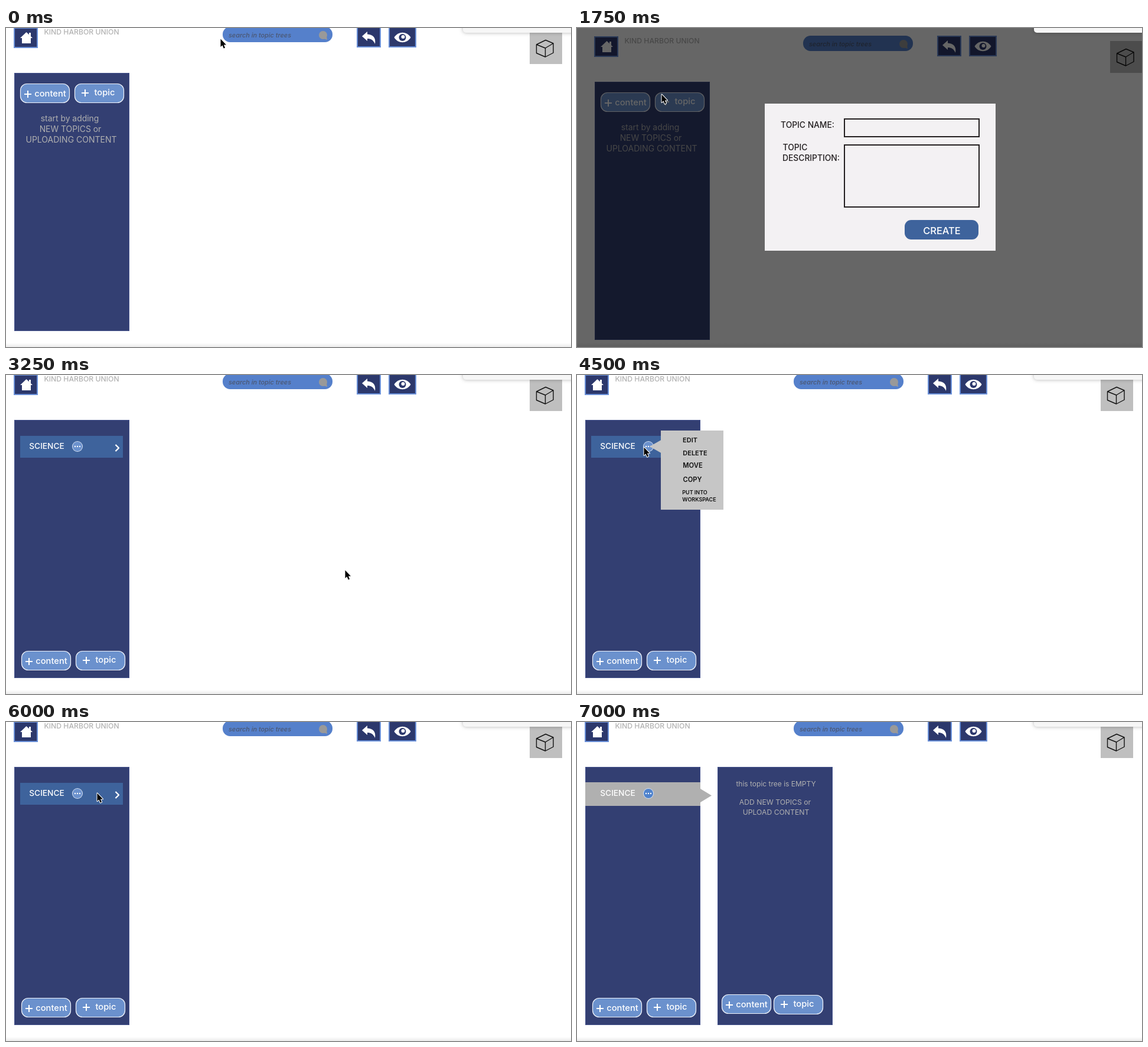
Recreate the animation shown at these times as an HTML page with a canvas. Size 957x540 px, loop 7.25 s.

```html
<!DOCTYPE html>
<html lang="en">
<head>
<meta charset="utf-8">
<title>Topic tree</title>
<style>
html, body { margin: 0; width: 100%; height: 100%; overflow: hidden; background: #fff; }
canvas { display: block; }
</style>
</head>
<body>
<canvas id="stage" width="957" height="540"></canvas>
<script>
const W = 957, H = 540, LOOP = 7250;
const ctx = document.getElementById('stage').getContext('2d');
const NAVY = '#333f72', BLUE = '#6b91cd', STEEL = '#3e639c', GREY = '#b0b0b0', INK = '#231f20';

// Pointer tip: start time, x, y
const POINTER = [
  [0, 363, 18], [250, 365, 13], [500, 223, 121], [750, 165, 110], [1000, 164, 107],
  [1250, 143, 112], [2250, 419, 195], [2500, 562, 311], [2750, 573, 325],
  [3000, 574, 328], [3250, 574, 330], [3500, 289, 222], [3750, 101, 143],
  [4000, 113, 122], [4750, 115, 122], [5500, 118, 122], [5750, 153, 120], [6000, 154, 120]
];
const POINTER_GONE = 6750;

function rect(x, y, w, h, fill) {
  ctx.fillStyle = fill;
  ctx.fillRect(x, y, w, h);
}

function frame(x, y, w, h, color, line) {
  ctx.strokeStyle = color;
  ctx.lineWidth = line;
  ctx.strokeRect(x + line / 2, y + line / 2, w - line, h - line);
}

function pill(x, y, w, h, r, fill) {
  ctx.beginPath();
  ctx.roundRect(x, y, w, h, r);
  ctx.fillStyle = fill;
  ctx.fill();
}

function disc(x, y, r, fill) {
  ctx.beginPath();
  ctx.arc(x, y, r, 0, Math.PI * 2);
  ctx.fillStyle = fill;
  ctx.fill();
}

function trace(points) {
  ctx.beginPath();
  points.forEach(([x, y]) => ctx.lineTo(x, y));
}

function polygon(points, fill) {
  trace(points);
  ctx.closePath();
  ctx.fillStyle = fill;
  ctx.fill();
}

function polyline(points, color, line) {
  trace(points);
  ctx.strokeStyle = color;
  ctx.lineWidth = line;
  ctx.stroke();
}

// Text centred on x, standing on baseline y
function text(str, x, y, size, color, style = '500') {
  ctx.font = `${style} ${size}px Inter, "Open Sans", sans-serif`;
  ctx.textAlign = 'center';
  ctx.fillStyle = color;
  ctx.fillText(str, x, y);
}

function plus(x, y) {
  rect(x - 6, y - 1, 12, 2, '#fff');
  rect(x - 1, y - 6, 2, 12, '#fff');
}

function addButton(label, x, y, plusX, plusY) {
  pill(x + .5, y + .5, 83, 32, 11, BLUE);
  ctx.strokeStyle = '#f0f4fb';
  ctx.lineWidth = 1.2;
  ctx.stroke();
  plus(x + plusX, y + plusY);
  text(label, x + 51, y + plusY + 4, 14.7, '#fff');
}

const contentButton = (x, y) => addButton('content', x, y, 13, 18);
const topicButton = (x, y) => addButton('topic', x, y, 18, 16);

function panel(x) {
  rect(x, 76, 195, 437, NAVY);
  frame(x, 76, 195, 437, '#44528c', 1);
}

function iconBox(x, y, w, h) {
  rect(x, y, w, h, '#2c386c');
  frame(x, y, w, h, '#6a90d8', 2);
}

function homeIcon() {
  iconBox(13, -1, 41, 35);
  polygon([[34.5, 7], [45, 17], [42, 17], [42, 26], [27, 26], [27, 17], [24, 17]], '#fff');
  rect(39, 8, 3, 6, '#fff');
}

function backIcon() {
  iconBox(594, -2, 41, 35);
  ctx.beginPath();
  ctx.moveTo(603, 14);
  ctx.lineTo(612, 6);
  ctx.lineTo(612, 10.5);
  ctx.bezierCurveTo(621, 11, 627, 16, 625, 27);
  ctx.bezierCurveTo(622, 20, 618, 18, 612, 18);
  ctx.lineTo(612, 22);
  ctx.closePath();
  ctx.fillStyle = '#fff';
  ctx.fill();
}

function eyeIcon() {
  iconBox(648, -2, 47, 35);
  ctx.beginPath();
  ctx.moveTo(657.5, 16);
  ctx.bezierCurveTo(664, 5, 679, 5, 685.5, 16);
  ctx.bezierCurveTo(679, 27, 664, 27, 657.5, 16);
  ctx.fillStyle = '#fff';
  ctx.fill();
  disc(671.5, 16, 6, '#2c386c');
  disc(672.5, 15, 3, '#fff');
}

function searchBar() {
  pill(367, -2, 186, 26, 12.5, '#5580cb');
  text('search in topic trees', 430, 15.5, 10.9, '#4b5671', 'italic 500');
  polygon([[538, 18], [543, 14], [544, 20]], '#999');
  disc(537, 12, 7, '#999');
}

function cubeIcon() {
  rect(887, 7, 55, 54, '#bfbfbf');
  ctx.lineJoin = 'round';
  const a = [898.5, 28], b = [914, 20.5], c = [927, 26], d = [927, 42], e = [913.5, 49], f = [898.5, 42.5], mid = [913.5, 34];
  polyline([a, b, c, d, e, f, a, mid, c], '#111', 1.4);
  polyline([mid, e], '#111', 1.4);
}

function header() {
  homeIcon();
  text('KIND HARBOR UNION', 128, 11, 12.2, '#b2b2b2');
  searchBar();
  backIcon();
  eyeIcon();
  cubeIcon();
}

function emptyTree() {
  panel(14);
  contentButton(24, 94);
  topicButton(116, 94);
  text('start by adding', 108, 158, 13.9, GREY, '400');
  text('NEW TOPICS or', 109, 176, 13.9, GREY, '400');
  text('UPLOADING CONTENT', 110.5, 194, 14, GREY, '400');
}

function topicTree(open) {
  panel(14);
  if (open) {
    rect(14, 102, 195, 40, GREY);
    polygon([[209, 113], [228, 124.5], [209, 136]], GREY);
  } else {
    rect(24, 103, 174, 37, STEEL);
    polyline([[185.5, 118], [191, 123.5], [185.5, 129]], '#fff', 2.3);
  }
  text('SCIENCE', 69, 125, 13.7, '#fff');
  disc(121, 121, 9, '#d5e0f2');
  disc(121, 121, 8, open ? '#4f82cc' : BLUE);
  [-4, 0, 4].forEach(dx => disc(121 + dx, 121, 1.2, '#fff'));
  contentButton(26, 467);
  topicButton(118, 467);
}

function subTree() {
  panel(238);
  text('this topic tree is EMPTY', 337, 109, 12, GREY, '400');
  text('ADD NEW TOPICS or', 335.5, 140, 12.2, GREY, '400');
  text('UPLOAD CONTENT', 337, 156.5, 12.2, GREY, '400');
  contentButton(245, 461);
  topicButton(333, 462);
}

function menu() {
  rect(142, 94, 106, 134, '#c6c6c6');
  polygon([[123, 121], [142.5, 110], [142.5, 132]], '#c6c6c6');
  const item = (str, x, y, size) => text(str, x, y, size, '#111', '600');
  item('EDIT', 191.5, 114, 11);
  item('DELETE', 200, 136, 11);
  item('MOVE', 196, 157, 11.2);
  item('COPY', 195.5, 181, 11.2);
  item('PUT INTO', 199.5, 202, 9);
  item('WORKSPACE', 207, 214, 9);
}

function dialog() {
  rect(318, 128, 391, 249, '#f3f1f3');
  text('TOPIC NAME:', 390.5, 169, 13.8, INK);
  text('TOPIC', 369.5, 207, 13.8, INK);
  text('DESCRIPTION:', 396.5, 225, 13.8, INK);
  frame(452, 153, 230, 32, INK, 2);
  frame(452, 197, 230, 107, INK, 2);
  pill(555, 325, 125, 33, 11, STEEL);
  text('CREATE', 618, 349, 16.4, '#fff');
}

function windowEdges() {
  const shade = ctx.createLinearGradient(0, 533, 0, 540);
  shade.addColorStop(0, 'rgba(0,0,0,0)');
  shade.addColorStop(1, 'rgba(0,0,0,.08)');
  rect(0, 533, W, 7, shade);
  ctx.save();
  ctx.shadowColor = 'rgba(0,0,0,.3)';
  ctx.shadowBlur = 6;
  pill(774, -20, 220, 28, 5, '#f6f6f6');
  ctx.restore();
}

function pointer(t) {
  if (t >= POINTER_GONE) return;
  const [, x, y] = POINTER.filter(p => p[0] <= t).pop();
  ctx.save();
  ctx.translate(x + .5, y + .5);
  ctx.lineJoin = 'round';
  trace([[0, 0], [0, 13.5], [3, 10.8], [5.2, 16], [7.6, 15], [5.4, 10], [9.5, 10]]);
  ctx.closePath();
  ctx.strokeStyle = '#fff';
  ctx.lineWidth = 2;
  ctx.stroke();
  ctx.fillStyle = '#000';
  ctx.fill();
  ctx.restore();
}

function draw(t) {
  const asking = t >= 1750 && t < 3250;
  const open = t >= 6250;
  rect(0, 0, W, H, '#fff');
  ctx.save();
  if (asking) ctx.translate(16, 15);
  header();
  if (t < 3250) emptyTree();
  else topicTree(open);
  ctx.restore();
  if (open) subTree();
  if (t >= 4500 && t < 5250) menu();
  if (asking) {
    rect(0, 0, W, H, 'rgba(0,0,0,.6)');
    dialog();
  }
  windowEdges();
  pointer(t);
}

const start = performance.now();
function tick() {
  draw((performance.now() - start) % LOOP);
  requestAnimationFrame(tick);
}
tick();
</script>
</body>
</html>
```
